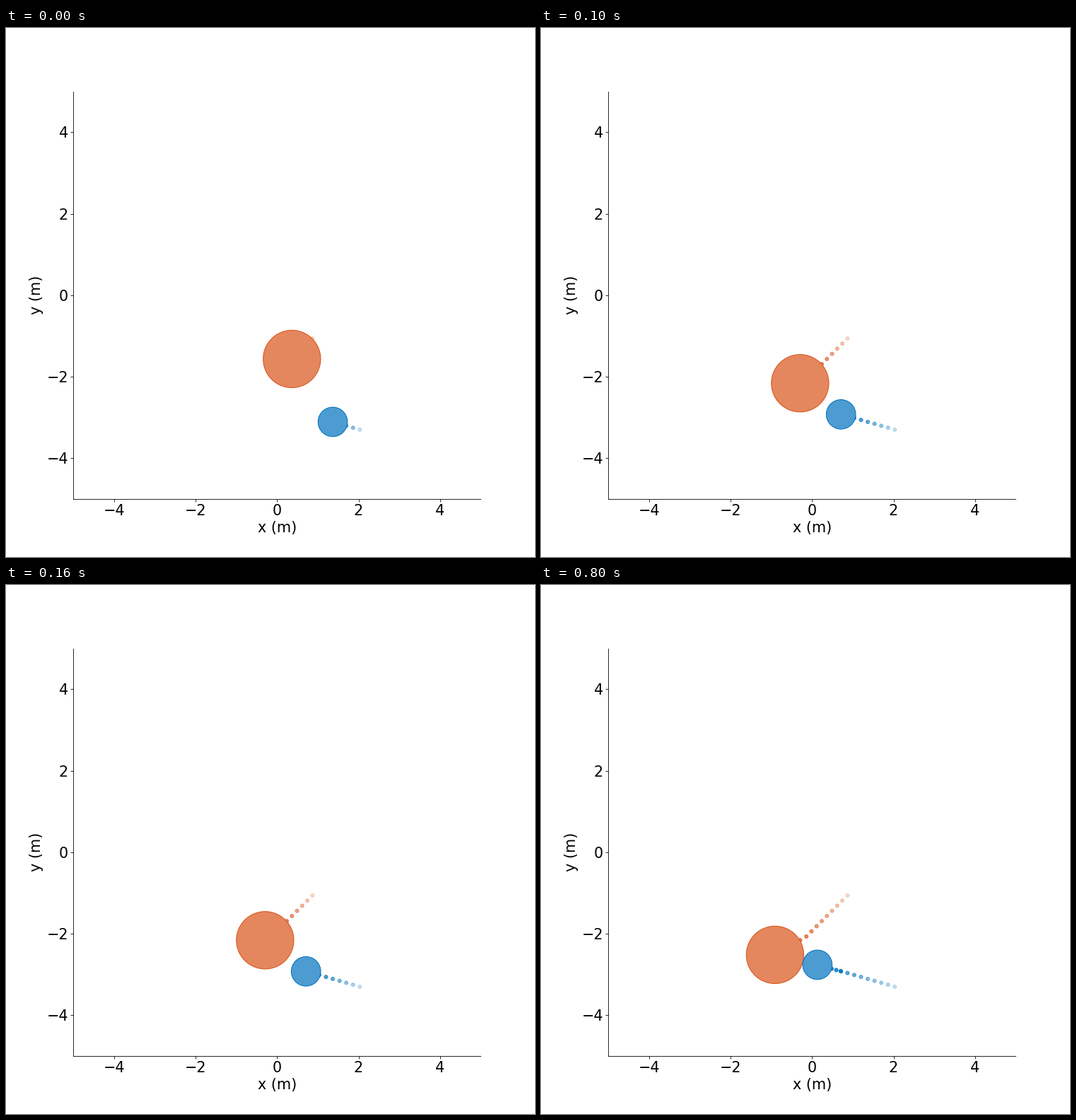
Recreate the animation shown at these times as a matplotlib script. Size 748x748 px, loop 1.2 s.

```python
import numpy as np
import matplotlib.pyplot as plt
from matplotlib.animation import FuncAnimation
from matplotlib.colors import to_rgb
from matplotlib.patches import Circle

FIRST, STRIDE, LAST = 4, 5, 14   # path steps shown by each frame
KEY_STEPS = (0, 8, 9, 14)        # launch, before contact, contact, end


class Body:
    """A disc that moves straight between key points and leaves a fading trail."""

    def __init__(self, ax, color, radius, xs, ys, z):
        steps = np.arange(LAST + 1)
        self.path = np.column_stack([np.interp(steps, KEY_STEPS, xs),
                                     np.interp(steps, KEY_STEPS, ys)])
        self.rgb = to_rgb(color)
        face = 0.3 + 0.7 * np.array(self.rgb)
        self.trail = ax.scatter([], [], s=20, linewidths=1.5, zorder=z)
        self.disc = Circle((0, 0), radius, facecolor=face, edgecolor=color,
                           linewidth=1, zorder=z + 1)
        ax.add_patch(self.disc)

    def pose(self, step):
        points = self.path[:step + 1]
        colors = [(*self.rgb, a) for a in np.linspace(0.2, 1, len(points))]
        self.trail.set_offsets(points)
        self.trail.set_facecolors(colors)
        self.trail.set_edgecolors(colors)
        self.disc.center = points[-1]


plt.rcParams.update({"font.family": "DejaVu Sans", "font.size": 20})
fig, ax = plt.subplots(figsize=(10, 10), dpi=74.8, facecolor="white")
ax.set(xlim=(-5, 5), ylim=(-5, 5), aspect="equal",
       xlabel="x (m)", ylabel="y (m)",
       xticks=range(-4, 5, 2), yticks=range(-4, 5, 2))
ax.spines[["top", "right"]].set_visible(False)

bodies = [
    Body(ax, "#D95319", 0.705, (0.868, -0.142, -0.295, -0.911),
         (-1.064, -2.07, -2.163, -2.521), z=3),
    Body(ax, "#0072BD", 0.361, (2.03, 0.702, 0.709, 0.13),
         (-3.303, -2.92, -2.927, -2.765), z=5),
]


def update(frame):
    step = min(FIRST + STRIDE * frame, LAST)
    for body in bodies:
        body.pose(step)
    return [a for b in bodies for a in (b.trail, b.disc)]


anim = FuncAnimation(fig, update, frames=12, interval=100,
                     repeat=True, repeat_delay=0, blit=False)
plt.show()
```
